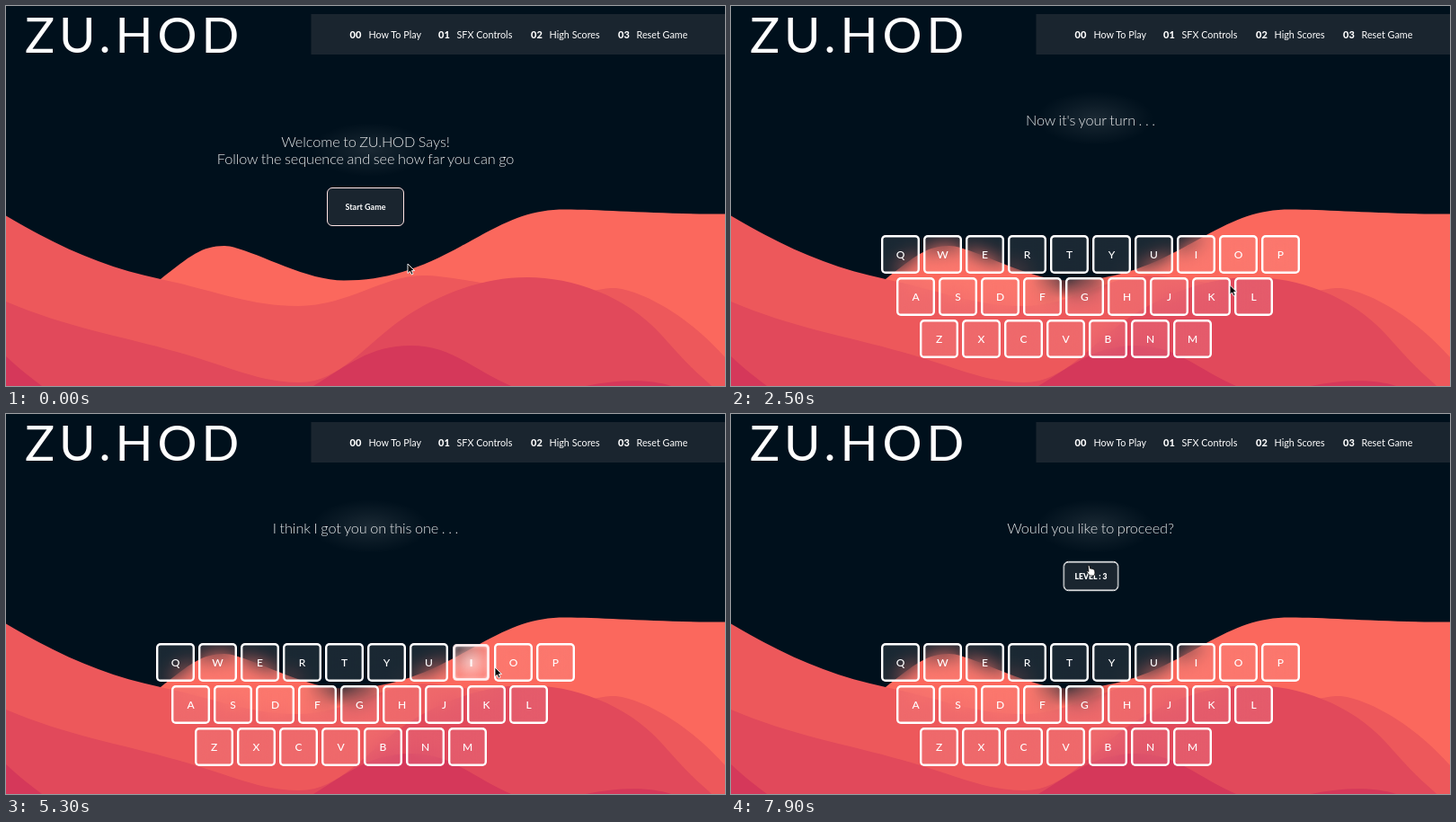
These frames come from a looping animation (800 px wide and 423 px high, 8000 ms). An HTML page:

```html
<!DOCTYPE html>
<html lang="en">
<head>
<meta charset="utf-8">
<title>Memory game</title>
<style>
  html, body { margin: 0; width: 100%; height: 100%; overflow: hidden; background: #00101c; }
  #stage { position: relative; width: 800px; height: 423px; overflow: hidden; color: #fff; font-family: Lato, sans-serif; }
  #stage > * { position: absolute; box-sizing: border-box; }
  svg { left: 0; top: 0; }
  .title { font-size: 55px; letter-spacing: 5px; }
  .nav { font-size: 10.8px; font-weight: 400; }
  .nav .num { font-size: 11px; font-weight: 800; }
  .glow { left: 340px; width: 130px; height: 60px;
    background: radial-gradient(closest-side, #ffffff1a, #ffffff0a 60%, #fff0); }
  .message { left: 0; width: 800px; text-align: center; font-size: 16.3px; line-height: 19.5px;
    font-weight: 300; letter-spacing: -.1px; word-spacing: -.7px; white-space: pre; opacity: .9; }
  .button { display: flex; align-items: center; justify-content: center; background: #1a252f;
    border: 1px solid #ffe4e4; border-radius: 6px; font-size: 9px; font-weight: 700; }
  .button.hover { transform: scale(.95); border-color: #fff; box-shadow: inset 0 0 0 .6px #fff; font-weight: 900; }
  .shade { left: 335px; top: 288px; width: 86px; height: 38px;
    background: radial-gradient(closest-side, #00101ccc, #00101c66 55%, #00101c00); }
  .key { display: flex; align-items: center; justify-content: center; border-radius: 5px;
    background: #ffffff1a; backdrop-filter: blur(11px); box-shadow: inset 0 0 0 2.4px #fff;
    font-size: 12px; font-weight: 500; }
  .key.lit { transform: scale(.95); font-weight: 900;
    background: radial-gradient(circle, #ffffff99, #ffffff33 70%);
    box-shadow: inset 0 0 0 3px #fff0f1, inset 0 0 6px 2px #fff9; }
  #cursor { left: 0; top: 0; overflow: visible; }
</style>
</head>
<body>
<div id="stage">
  <svg width="800" height="423" viewBox="0 0 800 423">
    <path fill="#fb685d" d="M172 304C205 278 218 267 243 267S330 305.5 376 305.5S460 293 507 267S580 226.5 622 226.5S720 231.5 800 231.5V423H172Z"/>
    <path fill="#ed585b" d="M0 233.5C60 269 110 291 172 304S270 334 325 334S420 300 463 300S570 320 610 320S660 314 676 314S745 330 800 391V423H0Z"/>
    <path fill="#e1495b" d="M0 329C65 357 130 368 190 385S280 418 325 419S400 377 440 349S530 302 580 302S690 322 730 367S770 408 785 423H0Z"/>
    <path fill="#d5385a" d="M0 390C15 404 28 414 40 423H0ZM342 423C380 400 405 378 450 378S515 402 562 423ZM645 423C680 416 715 415 740 423Z"/>
    <rect x="339.5" y="9" width="461" height="45" fill="#1a252f"/>
    <g fill="#fff">
      <text class="title" x="21" y="52">ZU.HOD</text>
      <g class="nav">
        <text class="num" x="382.5" y="35.5">00</text><text x="403.5" y="35.5">How To Play</text>
        <text class="num" x="481" y="35.5">01</text><text x="501.5" y="35.5">SFX Controls</text>
        <text class="num" x="584" y="35.5">02</text><text x="604.5" y="35.5">High Scores</text>
        <text class="num" x="681" y="35.5">03</text><text x="701.5" y="35.5">Reset Game</text>
      </g>
    </g>
  </svg>
  <div class="glow"></div>
  <div class="message"></div>
  <div class="button"></div>
  <div class="shade"></div>
  <svg id="cursor" width="16" height="16">
    <path id="arrow" d="M0 0V10.5L2.5 8.3L4.2 12L6 11.2L4.4 7.6H7.6Z" fill="#000" stroke="#fff" stroke-width=".9"/>
    <path id="hand" d="M-.9 1Q0-.6 1 1L1.6 4.2Q2.7 3.5 3.4 4.5Q4.5 4 5.1 5Q6.4 4.6 6.7 6L7 9L6 12H1.2L-2.2 7.7Q-2.2 6.4-.7 7L0 7.5Z"
      fill="#fff" stroke="#000" stroke-width=".8"/>
  </svg>
</div>
<script>
const stage = document.getElementById('stage');
const find = selector => stage.querySelector(selector);
const [glow, message, button, shade, cursor, arrow, hand] =
  ['.glow', '.message', '.button', '.shade', '#cursor', '#arrow', '#hand'].map(find);

const LOOP = 8000, STEP = 100;
const PROCEED = 'Would you like to proceed?';
const TURN = "Now it's your turn . . .";

// start time, message, button label
const scenes = [
  [0, 'Welcome to ZU.HOD Says!\nFollow the sequence and see how far you can go', 'Start Game'],
  [400, PROCEED, 'LEVEL : 1'],
  [1300, 'Just a little harder this time . . .'],
  [2500, TURN],
  [3600, PROCEED, 'LEVEL : 2'],
  [4900, 'I think I got you on this one . . .'],
  [6200, TURN],
  [7400, PROCEED, 'LEVEL : 3']
];

// letter, lit from, lit until
const presses = [
  ['L', 1900, 2300], ['L', 3000, 3300],
  ['I', 5200, 5500], ['L', 5700, 6000],
  ['I', 6400, 6600], ['L', 6800, 7100]
];

// time, x, y of the pointer tip
const route = [
  [0, 447, 287], [200, 415, 232], [400, 415, 232], [900, 404, 182], [1200, 404, 182],
  [1700, 430, 242], [2800, 583, 326], [3100, 583, 326], [3200, 617, 345], [3600, 617, 345],
  [4300, 482, 164], [4600, 404, 180], [4900, 404, 180], [5300, 544, 282], [6100, 544, 282],
  [6400, 519, 279], [6600, 519, 279], [6900, 583, 327], [7200, 583, 327], [7900, 398, 168]
];

const keys = [];
[['QWERTYUIOP', 167], ['ASDFGHJKL', 184], ['ZXCVBNM', 210]].forEach(([letters, left], row) => {
  [...letters].forEach((letter, i) => {
    const el = document.createElement('div');
    const box = { x: left + 47 * i, y: 255 + 47 * row, w: 43, h: 43 };
    el.className = 'key';
    el.textContent = letter;
    place(el, box);
    stage.insertBefore(el, cursor);
    keys.push({ el, letter, box });
  });
});

function place(el, { x, y, w, h }) {
  Object.assign(el.style, { left: x + 'px', top: y + 'px', width: w + 'px', height: h + 'px' });
}

const show = (el, visible) => { el.style.display = visible ? '' : 'none'; };

const inside = ([px, py], { x, y, w, h }) => px > x + 2 && px < x + w - 2 && py > y + 2 && py < y + h - 2;

function pointerAt(t) {
  const next = route.findIndex(stop => stop[0] > t);
  if (next < 0) return route[route.length - 1].slice(1);
  const [t0, x0, y0] = route[next - 1], [t1, x1, y1] = route[next];
  const p = (t - t0) / (t1 - t0), e = p * p * (3 - 2 * p);
  return [x0 + (x1 - x0) * e, y0 + (y1 - y0) * e];
}

function draw(t) {
  const [start, text, label] = scenes.filter(scene => scene[0] <= t).pop();
  const welcome = start === 0;
  const pointer = pointerAt(t);
  const box = welcome ? { x: 357, y: 202, w: 86, h: 43 } : { x: 368, y: 163, w: 65, h: 35 };

  message.textContent = text;
  message.style.top = (welcome ? 140.5 : 117) + 'px';
  glow.style.top = (welcome ? 130 : 95) + 'px';

  const overButton = Boolean(label) && inside(pointer, box);
  button.textContent = label || '';
  show(button, label);
  button.classList.toggle('hover', overButton);
  place(button, box);

  let overKey = false;
  show(shade, !welcome);
  for (const { el, letter, box: area } of keys) {
    show(el, !welcome);
    el.classList.toggle('lit', presses.some(([l, from, to]) => l === letter && t >= from && t < to));
    overKey ||= !welcome && inside(pointer, area);
  }

  const pointing = overButton || overKey;
  show(hand, pointing);
  show(arrow, !pointing);
  cursor.style.transform = `translate(${pointer[0]}px, ${pointer[1]}px)`;
}

const origin = performance.now();
let shown = -1;
function tick() {
  const t = Math.floor((performance.now() - origin) % LOOP / STEP) * STEP;
  if (t !== shown) draw(shown = t);
  requestAnimationFrame(tick);
}
tick();
</script>
</body>
</html>
```
